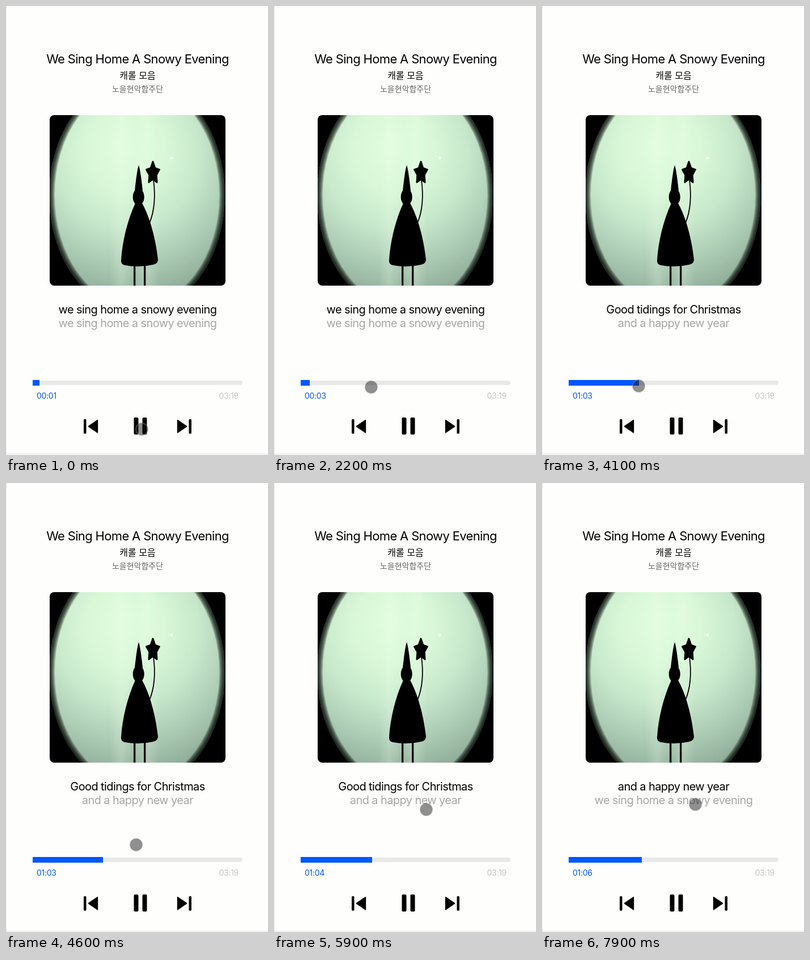
Recreate the animation shown at these times as an HTML page with a canvas. Size 462 by 790 pixels, loop 8 s.

```html
<!DOCTYPE html>
<html lang="ko">
<head>
<meta charset="utf-8">
<title>Music player</title>
<style>
  html, body { margin: 0; width: 100%; height: 100%; overflow: hidden; background: #fefefd; }
  #stage { position: absolute; left: 0; top: 0; width: 462px; height: 790px; overflow: hidden;
    font-family: Inter, "Noto Sans CJK KR", "Noto Sans CJK", sans-serif; }
  #stage div { position: absolute; left: 1px; width: 462px; line-height: 24px; text-align: center; white-space: pre; color: #000; }
  #stage .title { top: 81px; font-size: 22px; letter-spacing: -0.03em; }
  #stage .album { top: 110px; font-size: 16px; }
  #stage .artist { top: 134px; font-size: 14px; color: #666; }
  #stage .lyric { top: 522px; font-size: 20px; letter-spacing: -0.03em; }
  #stage .next { top: 546px; color: #a6a6a6; }
  #stage .time { top: 674px; left: 54px; width: 356px; font-size: 14px; letter-spacing: -0.02em; text-align: left; color: #0057ff; }
  #stage .total { text-align: right; color: #c4c4c4; }
  canvas { position: absolute; left: 0; top: 0; }
</style>
</head>
<body>
<div id="stage">
  <div class="title">We Sing Home A Snowy Evening</div>
  <div class="album">캐롤 모음</div>
  <div class="artist">노을현악합주단</div>
  <div class="lyric" id="line"></div>
  <div class="lyric next" id="next"></div>
  <div class="time" id="time"></div>
  <div class="time total">03:19</div>
  <canvas id="view" width="462" height="790"></canvas>
</div>
<script>
const LOOP = 8000, STEP = 100, TOTAL = 199, SEEK = 3900;
const $ = id => document.getElementById(id);
const g = $('view').getContext('2d');

const chorus = 'we sing home a snowy evening', wish = 'and a happy new year';
const lyrics = [
  { from: 0, lines: [chorus, chorus] },
  { from: 63, lines: ['Good tidings for Christmas', wish] },
  { from: 65, lines: [wish, chorus] }
];

// pointer glides: first step, last step, end point
const glides = [
  [0, 0, 239.5, 744.5], [500, 1000, 242, 742.5],
  [1900, 2200, 171.5, 670.5],
  [2900, 3800, 170.5, 668.5],
  [4300, 4600, 229.5, 636.5], [4700, 5000, 268, 580],
  [5700, 5900, 268.5, 574.5],
  [6100, 6500, 269.5, 568.5],
  [6900, 7900, 270.5, 565.5]
];

const two = n => String(n).padStart(2, '0');
const easeOut = p => 1 - (1 - p) ** 3;
const smooth = p => p * p * (3 - 2 * p);

function elapsed(t) {
  return t < SEEK ? 1 + Math.floor((t + 100) / 1000) : 63 + Math.floor((t - SEEK) / 1060);
}

function pointer(t) {
  let x = 0, y = 0;
  for (const [from, to, px, py] of glides) {
    if (t < from) break;
    const p = Math.min(1, (t - from + STEP) / (to - from + STEP));
    const e = from === 4700 ? easeOut(p) : smooth(p);
    x += (px - x) * e;
    y += (py - y) * e;
  }
  return [x, y];
}

function box(x, y, w, h, r, color) {
  g.fillStyle = color;
  g.beginPath();
  g.roundRect(x, y, w, h, r);
  g.fill();
}

function oval(x, y, rx, ry, color) {
  g.fillStyle = color;
  g.beginPath();
  g.ellipse(x, y, rx, ry, 0, 0, 7);
  g.fill();
}

function shade(grad, ...colors) {
  colors.forEach((c, i) => grad.addColorStop(i / (colors.length - 1), c));
  g.fillStyle = grad;
  g.fillRect(77, 192, 310, 300);
}

function path(d, color) {
  g.fillStyle = color;
  g.fill(new Path2D(d));
}

function lamp() {
  g.save();
  g.beginPath();
  g.ellipse(231, 333, 155, 206, 0, 0, 7);
  g.clip();
  shade(g.createRadialGradient(208, 245, 10, 215, 275, 250),
    '#e0fcde', '#d9f8d8', '#c8e8cc', '#abcab3', '#8aa794');
  for (const x of [203, 250])
    shade(g.createLinearGradient(x - 20, 0, x + 20, 0), '#efffea00', '#efffea38', '#efffea00');

  // soft dark rim
  g.strokeStyle = 'rgba(0,12,4,.16)';
  for (let w = 2; w <= 20; w += 2) {
    g.lineWidth = w;
    g.beginPath();
    g.ellipse(231, 333, 155, 206, 0, 0, 7);
    g.stroke();
  }
  g.restore();
  oval(292, 267.5, 2.5, 2.5, '#f4fff4');
}

function star(x, y) {
  g.beginPath();
  for (let i = 0; i < 10; i++) {
    const a = (i / 5 - .5) * Math.PI, r = i % 2 ? .54 : 1;
    g.lineTo(x + Math.cos(a) * 12 * r, y + Math.sin(a) * 20 * r);
  }
  g.closePath();
  g.lineWidth = 3;
  g.lineJoin = 'round';
  g.fill();
  g.stroke();
}

function figure() {
  path('M234 280 Q237 288 241 325 L227 325 Q231 288 234 280Z', '#000');
  oval(233.7, 336, 10, 15, '#000');
  path('M228 347 H240 C254 372 264 410 268 446 Q268 453 260 455 Q236 461 209 456 Q202 454 203 447 C205 415 214 377 228 347Z', '#000');
  g.fillRect(225, 455, 3.3, 37);
  g.fillRect(243, 455, 3.3, 37);
  g.strokeStyle = '#000';
  g.lineWidth = 1.8;
  g.stroke(new Path2D('M260 306 Q266 350 253 382'));
  star(259, 294);
}

function cover() {
  g.save();
  g.beginPath();
  g.roundRect(77, 192, 310, 300, 8);
  g.clip();
  g.fillStyle = '#000';
  g.fillRect(77, 192, 310, 300);
  lamp();
  figure();
  g.restore();
}

function skip() {
  box(137, 727, 4.5, 25.5, 1.5, '#000');
  path('M145.2 738.8 L161 728 Q162.2 727.6 162.2 729 V750.5 Q162.2 752 161 751.3 L145.2 740.6 Q144.4 739.7 145.2 738.8Z', '#000');
}

function controls(sec) {
  box(47, 659, 370, 8, 4, '#e9e9e9');
  box(47, 658, Math.round(10 + 360 * (sec + .05) / TOTAL), 10, 0, '#0057ff');
  skip();
  g.save();
  g.translate(464, 0);
  g.scale(-1, 1);
  skip();
  g.restore();
  for (const x of [225.5, 240.5]) box(x, 724, 8, 30, 2, '#000');
}

function touch(x, y) {
  oval(x, y, 10.5, 10.5, 'rgba(20,20,20,.47)');
  g.strokeStyle = 'rgba(120,120,120,.5)';
  g.lineWidth = 2;
  g.beginPath();
  g.arc(x, y, 10.5, 0, 7);
  g.stroke();
}

function draw(now) {
  const t = Math.floor(now % LOOP / STEP) * STEP;
  const sec = elapsed(t);
  const { lines } = lyrics.filter(l => l.from <= sec).pop();
  $('time').textContent = two(Math.floor(sec / 60)) + ':' + two(sec % 60);
  $('line').textContent = lines[0];
  $('next').textContent = lines[1];

  g.clearRect(0, 0, 462, 790);
  g.fillStyle = '#e2e2e2';
  g.fillRect(0, 0, 1, 790);
  g.fillRect(0, 788, 462, 1);
  cover();
  controls(sec);
  touch(...pointer(t));
}

const start = performance.now();
function frame() {
  draw(performance.now() - start);
  requestAnimationFrame(frame);
}
frame();
</script>
</body>
</html>
```
